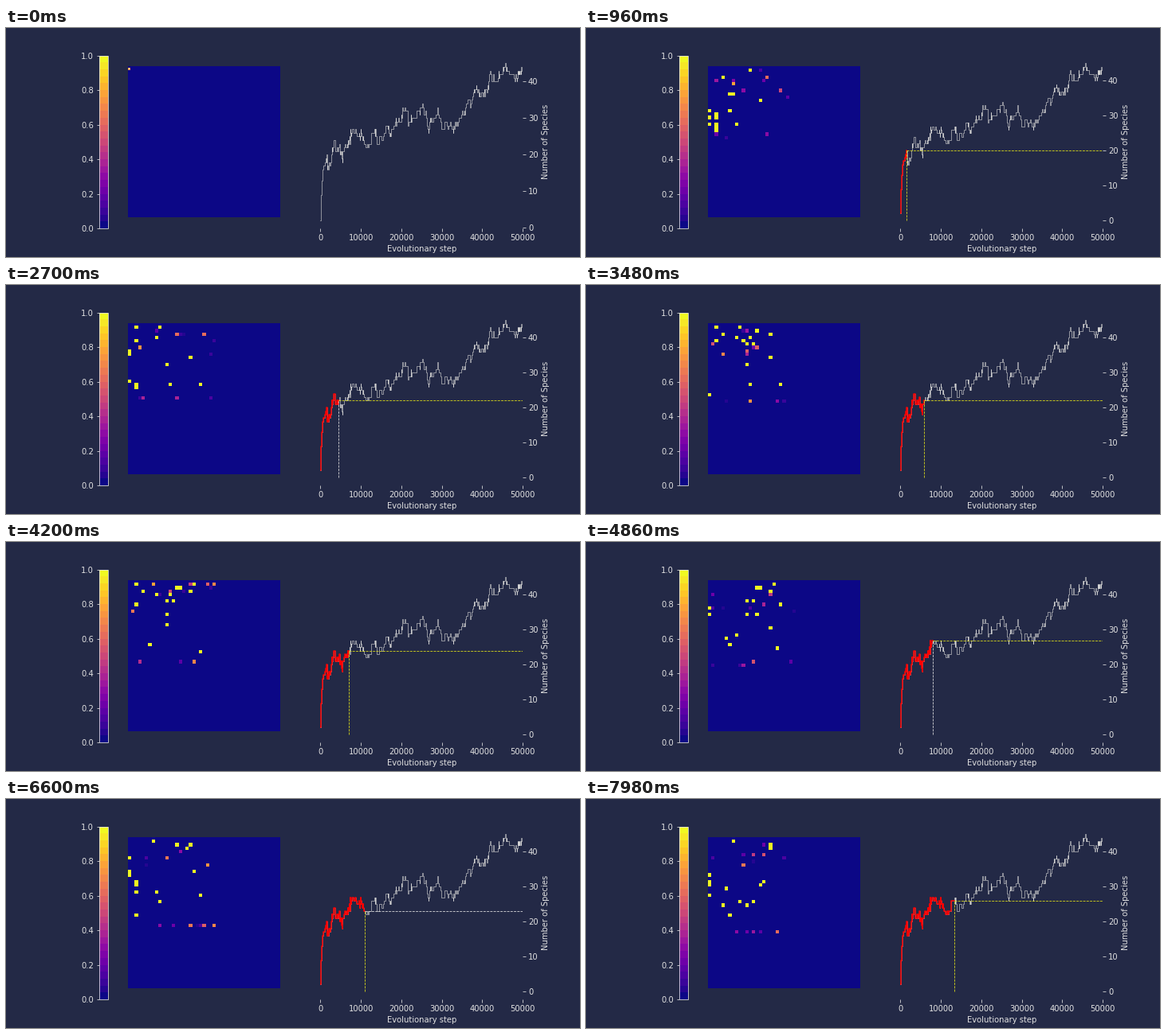
Animation, 720 px wide and 288 px high, one loop 8 s. Source, as a matplotlib script:

```python
import numpy as np
import matplotlib.pyplot as plt
from matplotlib.animation import FuncAnimation
from matplotlib.patches import Rectangle

W, H = 720, 288
FRAMES, LOOP = 134, 8000
CELL, X0, Y0 = 4.227, 153.0, 46.9
ROWS, COLS = 46, 45
BG, INK, YELLOW = "#232946", "#e0e0e0", "#e0e018"
rng = np.random.default_rng(11)

plt.rcParams.update({
    "font.family": "DejaVu Sans", "font.size": 10,
    "text.color": INK, "axes.labelcolor": INK,
    "xtick.color": INK, "ytick.color": INK, "axes.edgecolor": INK,
})


def px_axes(fig, left, top, right, bottom):
    return fig.add_axes([left / W, 1 - bottom / H,
                         (right - left) / W, (bottom - top) / H])


def species_count(steps):
    """A trend through a few turning points plus lazy, fading noise."""
    turns = [(0, 2), (.5, 15), (1.6, 20), (2.2, 18), (3.3, 23), (5.8, 21),
             (8.3, 28), (11.2, 21), (13.3, 25), (16, 25), (21, 31.5),
             (23, 29), (25, 32), (27, 28), (29, 30.5), (30, 28), (33, 28),
             (38.5, 38), (40.5, 37), (42.2, 42), (43.5, 40), (45.2, 43),
             (48, 42), (50, 43)]
    at, level = np.array(turns).T
    noise, drift = np.zeros(len(steps)), 0.0
    for i in range(2, len(steps)):
        if rng.random() < 0.6:
            drift = 0.6 * drift + rng.normal(0, 0.8 + 0.9 * np.exp(-i / 90))
        noise[i] = drift
    trend = np.interp(steps, at * 1000, level)
    return np.clip(np.round(trend + noise), 2, 45).astype(int)


def settled_cell(k):
    depth = 19 + k / 16
    if rng.random() < 0.4:
        col = rng.choice([0, 0, 2])
    else:
        col = rng.integers(4, 22)
    return int(rng.uniform(1, depth)), col, 1.0


def mutant_cell(k):
    depth = 20 + k / 16
    row = depth if rng.random() < 0.4 else rng.uniform(1, 10)
    return int(row), rng.integers(1, 26), 0.06 + 0.75 * rng.random() ** 1.5


def populate(grid, slots, make, life):
    """Each slot holds one cell after another, from a staggered start."""
    for slot in range(slots):
        k = 1 + slot
        while k < FRAMES:
            row, col, value = make(k)
            end = k + int(rng.integers(*life))
            span = grid[k:end, row, col]
            span[:] = np.maximum(span, value)
            k = end


steps = np.arange(501) * 100
count = species_count(steps)
grid = np.zeros((FRAMES, ROWS, COLS))
populate(grid, 16, settled_cell, (8, 45))
populate(grid, 13, mutant_cell, (1, 7))

fig = plt.figure(figsize=(W / 72, H / 72), dpi=72, facecolor=BG)
cmap = plt.get_cmap("plasma", 25)

ax_map = px_axes(fig, 153, 48, 344, 238)
image = ax_map.imshow(
    grid[0], cmap=cmap, vmin=0, vmax=1, interpolation="nearest",
    aspect="auto",
    extent=(X0, X0 + COLS * CELL, Y0 + ROWS * CELL, Y0))
ax_map.set(xlim=(153, 344), ylim=(238, 48))
ax_map.axis("off")
ax_map.add_patch(Rectangle((153, 48), 191, 190, color=cmap(0), lw=0,
                           zorder=-1))
seed = [Rectangle((153, 50), 3, 3, color="#ee8a50", lw=0, zorder=3),
        Rectangle((154, 50), 1, 2, color="#fff3a0", lw=0, zorder=4)]
for patch in seed:
    ax_map.add_patch(patch)

cax = px_axes(fig, 117.17, 34.56, 128.045, 252)
bar = fig.colorbar(image, cax=cax, ticklocation="left")
bar.set_ticks(np.arange(0, 1.01, 0.2))

ax = fig.add_subplot(1, 2, 2)
fig.subplots_adjust(left=0.125, right=0.9, bottom=0.125, top=0.88,
                    wspace=0.2)
ax.patch.set_visible(False)
for side in ax.spines.values():
    side.set_visible(False)
ax.yaxis.tick_right()
ax.yaxis.set_label_position("right")
ax.set(xlim=(0, 50000), xlabel="Evolutionary step",
       ylabel="Number of Species", xticks=range(0, 50001, 10000),
       yticks=range(0, 41, 10))
ax.plot(steps, count, color="#d3d3d3", lw=0.6, drawstyle="steps-post")
past, = ax.plot([], [], color="red", lw=1.5, drawstyle="steps-post")
across, = ax.plot([], [], "--", lw=0.8)
down, = ax.plot([], [], "--", lw=0.8)


def update(k):
    image.set_data(grid[k])
    for patch in seed:
        patch.set_visible(k == 0)
    ax.set_ylim((-0.15, 47.15) if k == 0 else (-2.25, 47.25))
    x, y = steps[k], count[k]
    past.set_data(steps[:k + 1], count[:k + 1])
    across.set_data([x, 50000], [y, y])
    down.set_data([x, x], [0, y])
    across.set_color(INK if k % 7 >= 5 else YELLOW)
    down.set_color(INK if k % 3 == 0 else YELLOW)
    for line in (past, across, down):
        line.set_visible(k > 0)
    return image, past, across, down


anim = FuncAnimation(fig, update, frames=FRAMES, interval=LOOP / FRAMES,
                     repeat=True, repeat_delay=0, blit=False)
plt.show()
```
